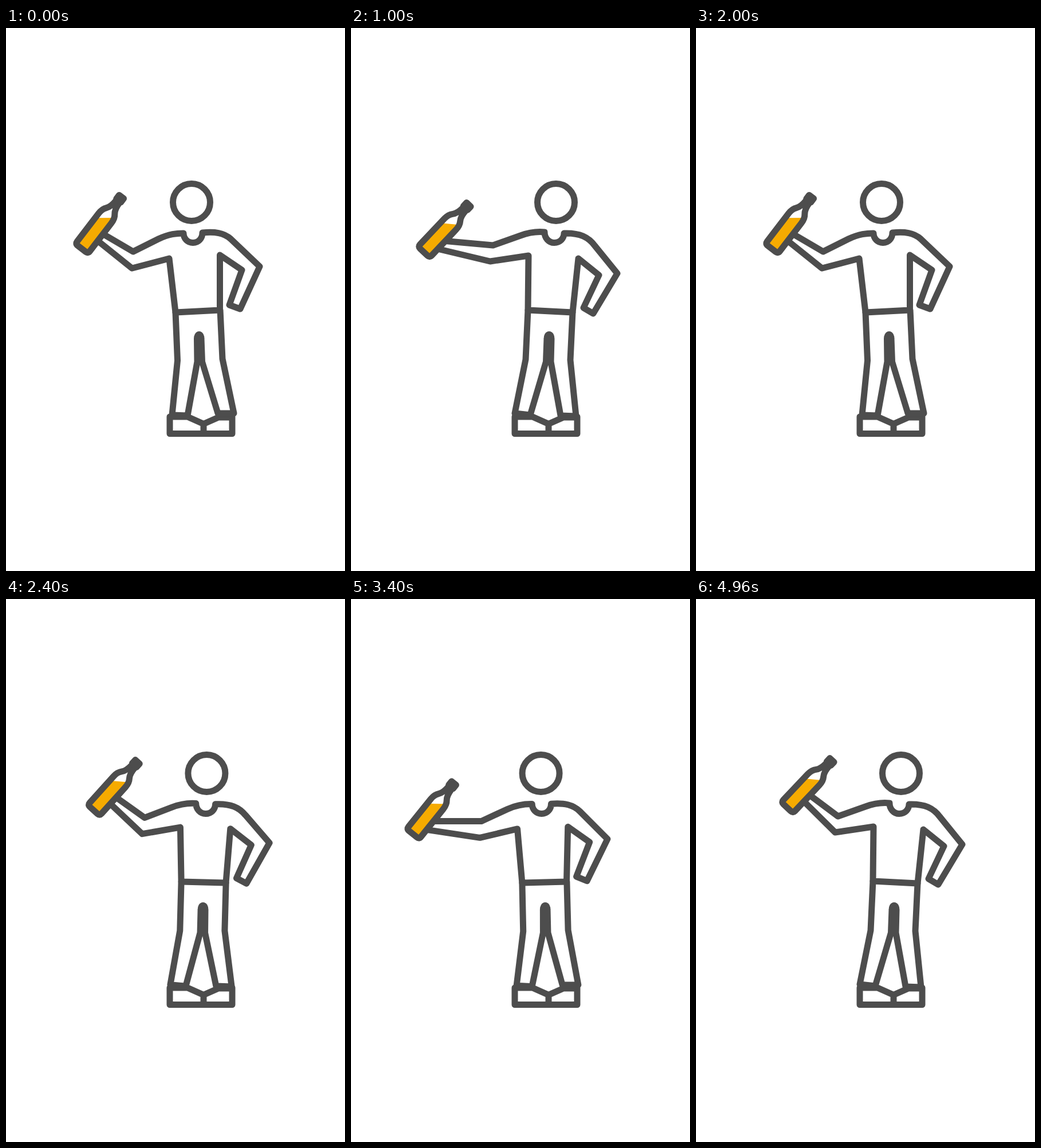
Write an HTML page that moves like this. It is 592 px wide and 947 px high and loops after 5 s.

```html
<!DOCTYPE html>
<html lang="en">
<head>
<meta charset="utf-8">
<title>Swaying figure with bottle</title>
<style>
  html, body { margin: 0; width: 100%; height: 100%; overflow: hidden; background: #fff; }
  svg { display: block; width: 100%; height: 100%; }
  .line { fill: none; stroke: #4d4d4d; stroke-width: 11; stroke-linecap: round; stroke-linejoin: round; }
  .glass { fill: #fff; }
  .beer { fill: #f6ab00; }
  .cap { fill: #4d4d4d; }
</style>
</head>
<body>
<svg viewBox="0 0 592 947">
  <defs>
    <path id="outline" d="M-14 -2V-64Q-14 -74 -9 -80Q-4 -86 -3.5 -100H3.5Q4 -86 9 -80Q14 -74 14 -64V-2Q14 3 9 3H-9Q-14 3 -14 -2Z"/>
  </defs>
  <g class="line">
    <path d="M286 678V707.5H395V678M286 678H317L345 690.5L371 679H395M345 691V707"/>
    <path id="legs"/>
    <path id="shirt"/>
    <circle id="head" cy="304" r="32.5"/>
  </g>
  <!-- Origin near the middle of the base, pointing up -->
  <g id="bottle">
    <use href="#outline" class="glass"/>
    <path class="beer" d="M-12 1V-55.5L12 -74V1Z"/>
    <use href="#outline" class="line"/>
    <rect class="line cap" x="-5" y="-111" width="10" height="8"/>
  </g>
</svg>
<script>
const $ = id => document.getElementById(id);
const LOOP = 5000, STEP = 40, SWAY = 1000, ARM = 300;

// Each pair: leaning left, leaning right
const SHIRT = [
  `222 390L266 368C285 359 298 358 310 358C310 367 317 374.5 326.5 374.5
   C336 374.5 343 367 343 357C365 355 380 357 392 367.5
   L443 416L409 490L390 483L412 422L373.5 396L373.5 492L296 496L285 402L220 419`,
  `248 379L296 362C315 355 328 355 338 356C338 366 345 374.5 355 374.5
   C365 374.5 372 367 372 358C400 357 415 365 426 380
   L465 428L423 498L406 488L433 431L397 402L387 496L309 492L310 397L243 407`];
const LEGS = [
  `M296 496L299.5 580L290 675L317 676L334 582L333.5 542C333.5 532 341 532 341 542L342.5 582
   L370 672L398 672L378 577L374 492M337.5 542L338 580`,
  `M309 492L305 578L286 672L313 675L340.5 582L342 542C342 532 350 532 350 542L349 582
   L366 676L393 677L383 579L387 496M346 542L345 580`];

const mix = (a, b, k) => a + (b - a) * k;

function morph([a, b], k) {
  const ends = b.match(/[\d.]+/g);
  let i = 0;
  return a.replace(/[\d.]+/g, n => mix(+n, +ends[i++], k).toFixed(2));
}

// cubic-bezier(1/3, 0, 0, 1)
function ease(x) {
  if (x <= 0) return 0;
  if (x >= 1) return 1;
  let lo = 0, hi = 1, s = 0.5;
  for (let i = 0; i < 24; i++) {
    s = (lo + hi) / 2;
    if (s * (1 - s) ** 2 + s ** 3 < x) lo = s; else hi = s;
  }
  return s * s * (3 - 2 * s);
}

function draw(t) {
  const e = ease(t % SWAY / SWAY);
  const lean = Math.floor(t / SWAY) % 2 ? 1 - e : e;
  const ramp = start => ease((t - start) / ARM);
  const drop = ramp(700) - ramp(1700) + ramp(3000) - ramp(4000);

  const x = mix(134, 161.2, lean) - drop * mix(29.5, 32, lean);
  const y = mix(382.5, 361.7, lean) + drop * mix(30.5, 27, lean);
  const tilt = mix(37.5, 43.4, lean);
  const sin = Math.sin(tilt * Math.PI / 180), cos = Math.cos(tilt * Math.PI / 180);
  const grip = up => `${x + up * sin + 14 * cos} ${y - up * cos + 14 * sin}`;

  $("head").setAttribute("cx", mix(324, 358, lean));
  $("legs").setAttribute("d", morph(LEGS, lean));
  $("shirt").setAttribute("d",
    `M${grip(mix(40, 37, drop))}L${morph(SHIRT, lean)}L${grip(mix(25, 18, drop))}`);
  $("bottle").setAttribute("transform", `translate(${x} ${y}) rotate(${tilt})`);
}

function tick() {
  draw(Math.floor(performance.now() % LOOP / STEP) * STEP);
  requestAnimationFrame(tick);
}
tick();
</script>
</body>
</html>
```
